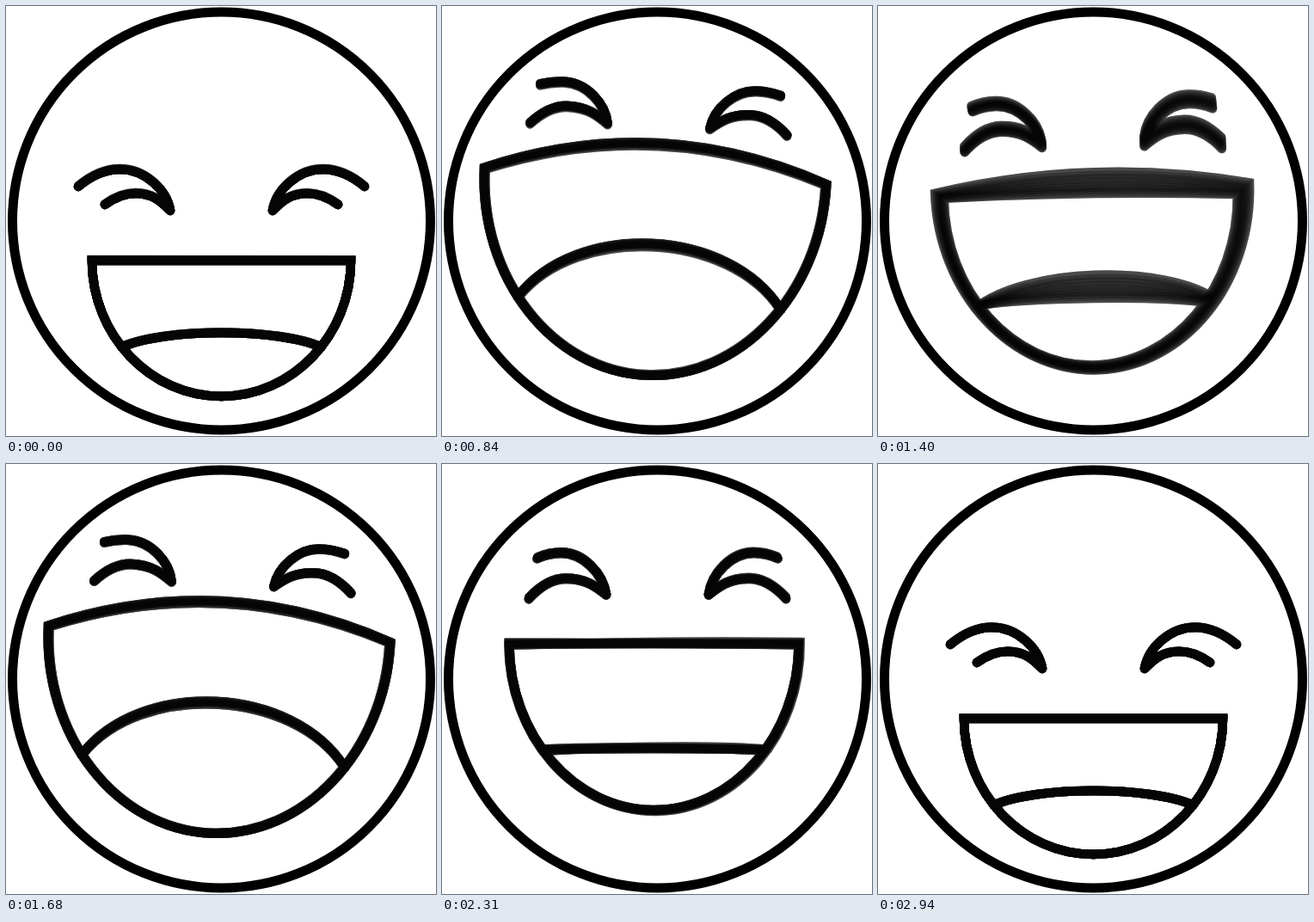
An HTML page with a canvas that plays this animation: 500x500 px, repeating every 3010 ms.

```html
<!DOCTYPE html>
<html lang="en">
<head>
<meta charset="utf-8">
<title>Laughing face</title>
<style>
  html, body { margin: 0; width: 100%; height: 100%; overflow: hidden; background: #fff; }
  canvas { display: block; }
</style>
</head>
<body>
<canvas id="stage" width="500" height="500"></canvas>
<script>
const ctx = document.getElementById('stage').getContext('2d');
const STEP = 70, LOOP = 3010;
const LAUGH = 840, SETTLE = 2310, END = LOOP - STEP;
const CENTER = 250.5, PIVOT_Y = 170;
const SHUTTER = 32, SAMPLES = 9;

// Symmetric expressions; x values are distances from the face's middle line.
const rest = {
  mouthX: 0, half: 150.5, cornerY: 296, lipY: 296, chinY: 454, tongueY: 380,
  browX: 166.5, browY: 210, browTop: 190, innerY: 238, lidX: 135.5, lidY: 231, lidTop: 218
};
const smile = {
  mouthX: -4, half: 168, cornerY: 209, lipY: 209, chinY: 402, tongueY: 331,
  browX: 139.5, browY: 109, browTop: 103, innerY: 152, lidX: 149.5, lidY: 156, lidTop: 133
};
const roar = {
  mouthX: -1, half: 199.5, cornerY: 197.5, lipY: 159, chinY: 430, tongueY: 276,
  browX: 140, browY: 97, browTop: 93, innerY: 139, lidX: 149.5, lidY: 142.5, lidTop: 121
};

const clamp = u => Math.min(1, Math.max(0, u));
const ease = u => (1 - Math.cos(Math.PI * clamp(u))) / 2;

function blend(a, b, u) {
  const out = {};
  for (const key in a) out[key] = a[key] + (b[key] - a[key]) * u;
  return out;
}

// The head rocks from side to side, and the mouth opens widest at each end.
function faceAt(t) {
  const joy = ease(t / 490) * (1 - ease((t - SETTLE) / (END - SETTLE)));
  const rocking = ease(t / 700) * (1 - ease((t - SETTLE + STEP) / 280));
  const tilt = rocking * Math.cos(Math.PI * (t - LAUGH) / 420);
  const open = tilt * tilt;
  const calm = clamp((SETTLE - t) / (SETTLE - LAUGH));
  const bob = t > LAUGH ? 24 * calm * (1 - open) : 0;
  return { shape: blend(rest, blend(smile, roar, open), joy), tilt, bob };
}

function drawMouth({ mouthX, half, cornerY, lipY, chinY, tongueY }) {
  const k = .55, drop = chinY - cornerY;
  ctx.moveTo(mouthX - half, cornerY);
  ctx.quadraticCurveTo(mouthX, 2 * lipY - cornerY, mouthX + half, cornerY);
  ctx.bezierCurveTo(mouthX + half, cornerY + k * drop, mouthX + k * half, chinY, mouthX, chinY);
  ctx.bezierCurveTo(mouthX - k * half, chinY, mouthX - half, cornerY + k * drop, mouthX - half, cornerY);
  ctx.closePath();

  // The tongue's ends lie on the jaw line.
  const endX = half * .77, endY = cornerY + drop * .638;
  const domeY = (4 * tongueY - endY) / 3;
  ctx.moveTo(mouthX - endX, endY);
  ctx.bezierCurveTo(mouthX - endX * .58, domeY, mouthX + endX * .58, domeY, mouthX + endX, endY);
}

function arch(x, y, topX, topY, endX, endY, lean) {
  const dx = endX - topX, dy = endY - topY;
  ctx.moveTo(x, y);
  ctx.quadraticCurveTo((x + topX) / 2, topY, topX, topY);
  ctx.bezierCurveTo(topX + .5 * dx, topY, endX - lean * dx, endY - .5 * dy, endX, endY);
}

function drawEye(side, { browX, browY, browTop, innerY, lidX, lidY, lidTop }) {
  const inner = side * 59.5;
  arch(side * browX, browY, side * (80 + .23 * browX), browTop, inner, innerY, .07);
  arch(side * lidX, lidY, side * (32 + .5 * lidX), lidTop, inner, innerY, .25);
}

function drawFeatures({ shape, tilt, bob }) {
  ctx.save();
  ctx.translate(CENTER, PIVOT_Y + bob);
  ctx.rotate(.049 * tilt);
  ctx.translate(0, -PIVOT_Y);
  ctx.beginPath();
  drawMouth(shape);
  drawEye(-1, shape);
  drawEye(1, shape);
  ctx.stroke();
  ctx.restore();
}

function draw(t) {
  ctx.globalAlpha = 1;
  ctx.fillStyle = '#fff';
  ctx.fillRect(0, 0, 500, 500);
  ctx.strokeStyle = '#000';
  ctx.lineWidth = 11;
  ctx.beginPath();
  ctx.arc(CENTER, 250, 243, 0, 2 * Math.PI);
  ctx.stroke();

  // Motion blur: a grey sweep with a core that darkens where samples overlap.
  const faces = Array.from({ length: SAMPLES }, (_, i) =>
    faceAt(t + SHUTTER * (2 * i / (SAMPLES - 1) - 1)));
  ctx.lineWidth = 10.5;
  ctx.lineCap = 'round';
  ctx.strokeStyle = '#666';
  faces.forEach(drawFeatures);
  ctx.strokeStyle = '#000';
  ctx.globalAlpha = .28;
  faces.forEach(drawFeatures);
}

const start = performance.now();
function tick() {
  const t = (performance.now() - start) % LOOP;
  draw(Math.floor(t / STEP) * STEP);
  requestAnimationFrame(tick);
}
tick();
</script>
</body>
</html>
```
